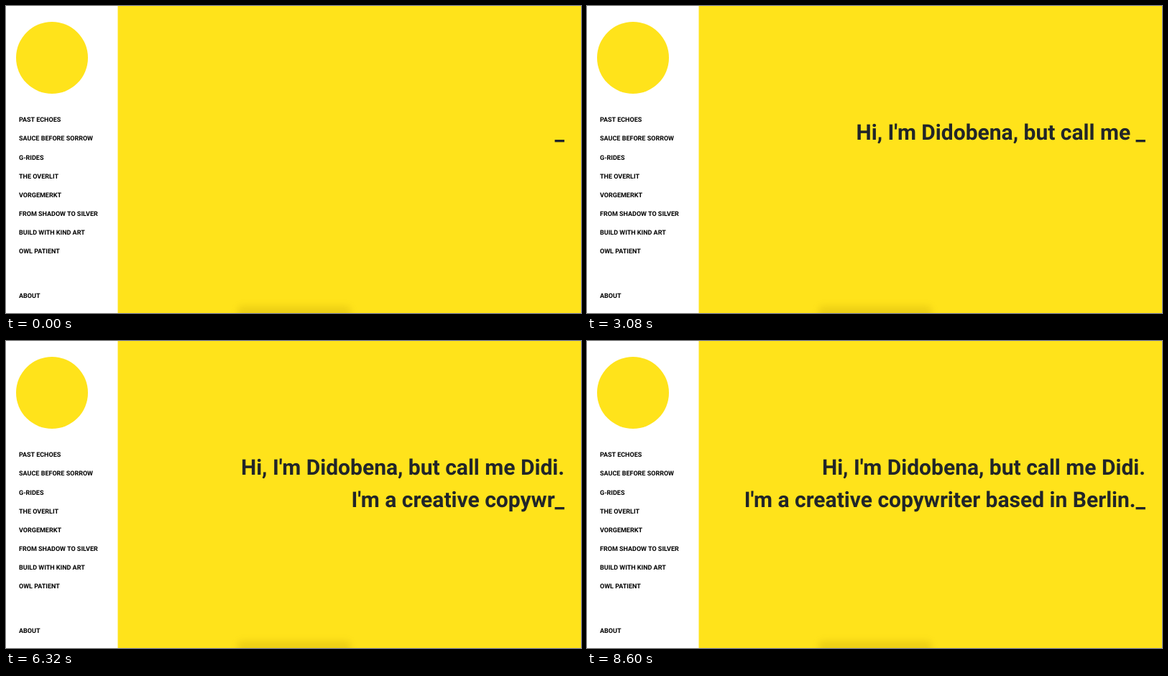
Write an HTML page that moves like this. It is 800 px wide and 427 px high and loops after 8.72 s.

```html
<!DOCTYPE html>
<html lang="en">
<head>
<meta charset="utf-8">
<title>Portfolio intro</title>
<style>
  html, body { margin: 0; width: 100%; height: 100%; overflow: hidden; background: #ffe31b; }
  svg { display: block; width: 800px; height: 427px; }
  text { font-family: Roboto, Arial, sans-serif; font-weight: 700; text-rendering: geometricPrecision; }
  #menu text { font-size: 9px; fill: #000; }
  #intro text { font-size: 30px; fill: #212529; text-anchor: end; }
</style>
</head>
<body>
<svg viewBox="0 0 800 427">
  <defs>
    <filter id="soft" x="-20%" y="-150%" width="140%" height="400%">
      <feGaussianBlur stdDeviation="5"/>
    </filter>
  </defs>
  <rect width="800" height="427" fill="#ffe31b"/>
  <rect x="322" y="417" width="158" height="25" rx="7" fill="#a88600" opacity=".2" filter="url(#soft)"/>
  <rect width="155.5" height="427" fill="#fff"/>
  <circle cx="64" cy="72" r="50" fill="#ffe31b"/>
  <g id="menu"></g>
  <g id="intro">
    <text x="777" y="185.6"></text>
    <text x="777" y="230.6"></text>
  </g>
</svg>
<script>
const LOOP = 8720;
const TICK = 40;     // screen refresh step
const START = 76;    // first letter
const KEY = 103.5;   // time per letter
const PAUSE = 503.5; // wait before the second line

const lines = [
  "Hi, I'm Didobena, but call me Didi.",
  "I'm a creative copywriter based in Berlin."
];
const items = [
  "PAST ECHOES", "SAUCE BEFORE SORROW", "G-RIDES", "THE OVERLIT",
  "VORGEMERKT", "FROM SHADOW TO SILVER", "BUILD WITH KIND ART", "OWL PATIENT"
];

const menu = document.getElementById("menu");
function addItem(label, y) {
  const el = document.createElementNS("http://www.w3.org/2000/svg", "text");
  el.setAttribute("x", 18);
  el.setAttribute("y", y);
  el.textContent = label;
  menu.append(el);
}
items.forEach((label, i) => addItem(label, 161.3 + i * 26.1));
addItem("ABOUT", 405.7);

const rows = document.querySelectorAll("#intro text");
const breakAt = START + (lines[0].length - 1) * KEY + PAUSE;

function show(row, str) {
  if (row.textContent !== str) row.textContent = str;
}

function typed(line, elapsed) {
  const n = Math.max(0, Math.floor(elapsed / KEY));
  return line.slice(0, n) + "_";
}

function draw(now) {
  const t = Math.floor((now % LOOP) / TICK) * TICK;
  const second = t >= breakAt;
  show(rows[0], second ? lines[0] : typed(lines[0], t - START + KEY));
  show(rows[1], second ? typed(lines[1], t - breakAt) : "");
}

const begin = performance.now();
function frame() {
  draw(performance.now() - begin);
  requestAnimationFrame(frame);
}
frame();
</script>
</body>
</html>
```
